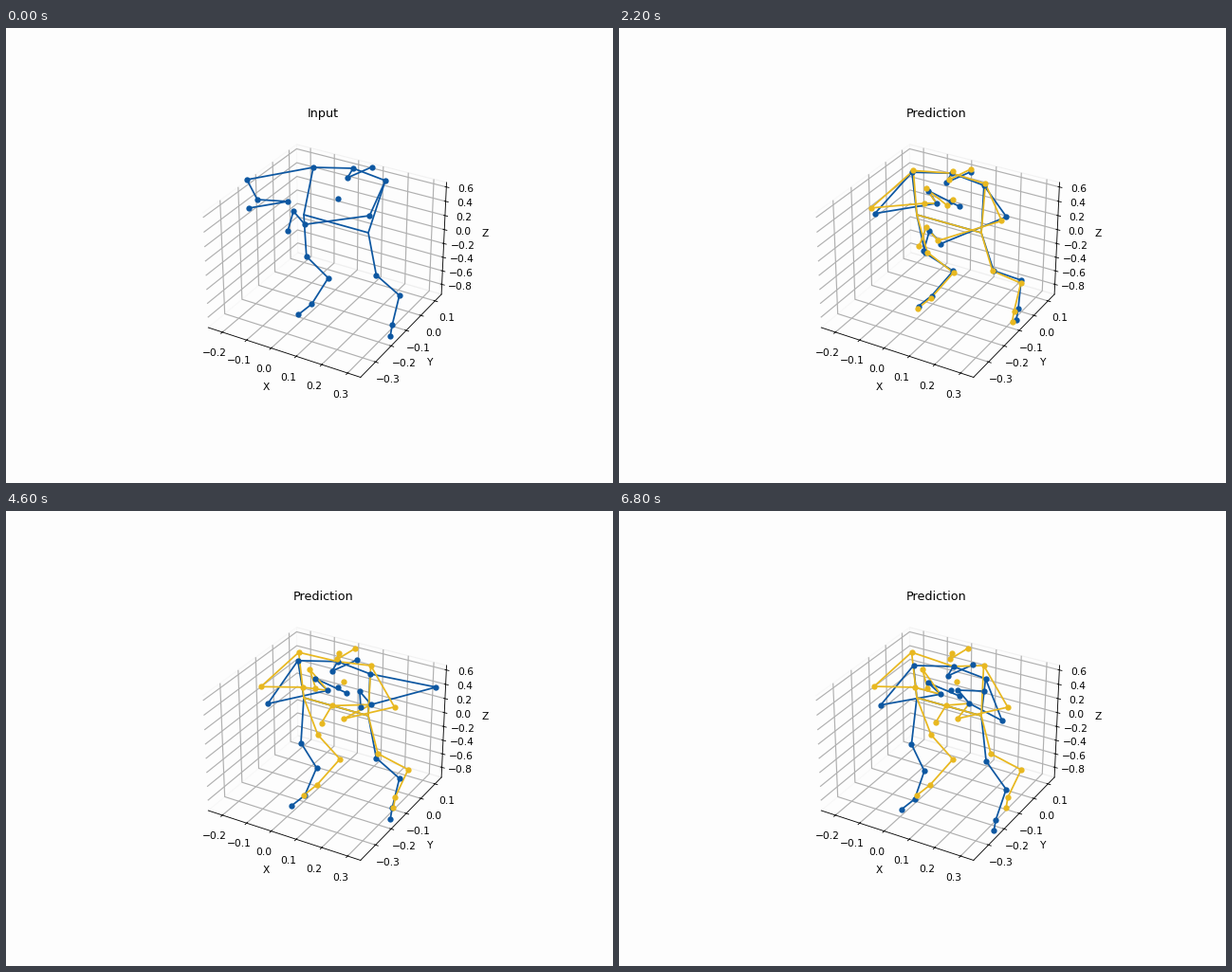
A matplotlib script for the animation above (7000 ms loop, 640 px wide and 480 px high).

```python
import numpy as np
import matplotlib.pyplot as plt
from matplotlib.animation import FuncAnimation

W, H, DPI = 640, 480, 76.8
FRAMES, STEP_MS, SPLIT = 35, 200, 10
PAPER, BLUE, YELLOW = "#fdfdfd", "#0d57a1", "#e8b820"

HIPS = [(314, 197), (382, 216)]
NECK, L_WRIST, R_WRIST = 0, 6, 11

# 0-2 head, 3 spine, 4-8 and 9-13 arms, 14-17 and 18-21 legs,
# 22-23 hips, 24-26 observed neck and wrists
CHAINS = [
    [0, 1, 2],
    [4, 24, 9],
    [4, 5, 6, 25, 7, 8],
    [9, 10, 11, 26, 12, 13],
    [4, 22, 23, 9],
    [22, 14, 15, 16, 17],
    [23, 18, 19, 20, 21],
]


def bell(t, mid, width):
    return np.exp(-((t - mid) / width) ** 2)


def step(t, mid, width):
    return 0.5 + 0.5 * np.tanh((t - mid) / (2 * width))


def swing(t, peak):
    """One slow stride, largest at its peak."""
    return np.cos(np.pi * (t - peak) / 21)


def shift(point, dx, dy):
    return point[0] + dx, point[1] + dy


def body(neck, look, crown, spine, left_arm, right_arm, point,
         left_leg, right_leg):
    """All joints; shoulders, right hand and toes follow their parents."""
    head = shift(neck, *look)
    hand = shift(right_arm[-1], -12, -14)
    return np.array([
        neck, head, shift(head, *crown), spine,
        shift(neck, -42, -1), *left_arm,
        shift(neck, 34, 13), *right_arm, hand, shift(hand, *point),
        *left_leg, shift(left_leg[-1], -14, 11),
        *right_leg, shift(right_leg[-1], -2, 11.5),
    ], float)


def stride(middle, reach, amount):
    return np.array(middle) + amount * np.array(reach)


def observed(t):
    start = bell(t, 0, 4)
    curl = step(t, 25, 1.5)
    left_arm = [
        (276 - (22 + 4.6 * t) * bell(t, 0, 7), 205 - 45 * np.exp(-t / 7)),
        (339 - 74 * bell(t, 0, 6.5), 181 + 0.36 * t),
        (326 - 29 * start, 167 + 0.42 * t + 16 * start),
        (359 - 103 * start, 185 + 0.3 * t + 5 * start),
    ]
    right_arm = [
        (382 + 72 * bell(t, 22, 11), 198 + 0.7 * t - 34 * bell(t, 20, 7)),
        (315 + 70 * step(t, 12, 1.6) - 20 * bell(t, 36, 4),
         203 + 25 * bell(t, 10, 7.5)),
    ]
    return body(
        neck=(344 + 22 * bell(t, 0, 8.5) + 0.25 * t, 148 + 0.47 * t),
        look=(-6, 10), crown=(26, -11.5),
        spine=(350, 180 + 0.25 * t),
        left_arm=left_arm, right_arm=right_arm,
        point=(-6 + 34 * curl, 21 - 20 * curl),
        left_leg=stride([(315, 242), (336, 266), (320, 294)],
                        [(8, -5), (17, -10), (10, -12)], swing(t, 9)),
        right_leg=stride([(391, 260), (416, 280), (409, 311)],
                         [(4, -4), (8, -14), (12, -15)], swing(t, 11.5)))


rest = body(neck=(350.5, 150), look=(-1, 6), crown=(18, -11),
            spine=(356, 180),
            left_arm=[(269, 185), (312, 186), (320, 167), (325, 187)],
            right_arm=[(410, 207), (357, 219)], point=(-11, 18),
            left_leg=[(329, 236), (352, 262), (328, 289)],
            right_leg=[(392, 256), (424, 273), (410, 302)])


def predicted(t):
    """The last observed pose relaxes into a mean pose."""
    start = SPLIT - 1
    return rest + (observed(start) - rest) * np.exp((start - t) / 4.5)


plt.rcParams["grid.linewidth"] = 1.1
fig = plt.figure(figsize=(W / DPI, H / DPI), dpi=DPI, facecolor=PAPER)

SIDE = 285.8
ax = fig.add_axes([191.7 / W, 93.5 / H, SIDE / W, SIDE / H], projection="3d")
ax.patch.set_visible(False)
ax.view_init(elev=30, azim=-60)
ax.set_xticks(np.arange(-2, 4) / 10)
ax.set_yticks(np.arange(-3, 2) / 10)
ax.set_zticks(np.arange(-4, 4) / 5)
ax.set_xlim(-0.2594, 0.3493)
ax.set_ylim(-0.3925, 0.1467)
ax.set_zlim(-0.949, 0.663)
ax.set_xlabel("X")
ax.set_ylabel("Y")
ax.set_zlabel("Z")
for axis in (ax.xaxis, ax.yaxis, ax.zaxis):
    axis.pane.set_fill(False)
title = ax.set_title("Input")

stage = fig.add_axes([0, 0, 1, 1])
stage.set_xlim(0, W)
stage.set_ylim(H, 0)
stage.axis("off")


class Skeleton:
    def __init__(self, color, order):
        self.bones = [stage.plot([], [], color=color, lw=1.65, zorder=order)[0]
                      for _ in CHAINS]
        self.dots, = stage.plot([], [], "o", color=color, ms=5.9, mew=0,
                                zorder=order + 2)

    def show(self, joints, anchors):
        points = np.vstack([joints, HIPS, anchors])
        for bone, chain in zip(self.bones, CHAINS):
            bone.set_data(*points[chain].T)
        self.dots.set_data(*joints.T)

    def set_visible(self, on):
        for artist in self.bones + [self.dots]:
            artist.set_visible(on)


truth = Skeleton(BLUE, 2)
guess = Skeleton(YELLOW, 3)


def draw(i):
    joints = observed(i)
    anchors = joints[[NECK, L_WRIST, R_WRIST]]
    truth.show(joints, anchors)
    predicting = i >= SPLIT
    guess.set_visible(predicting)
    if predicting:
        guess.show(predicted(i), anchors)
    title.set_text("Prediction" if predicting else "Input")
    return []


anim = FuncAnimation(fig, draw, frames=FRAMES, interval=STEP_MS,
                     init_func=lambda: draw(0), repeat=True, repeat_delay=0)
plt.show()
```
